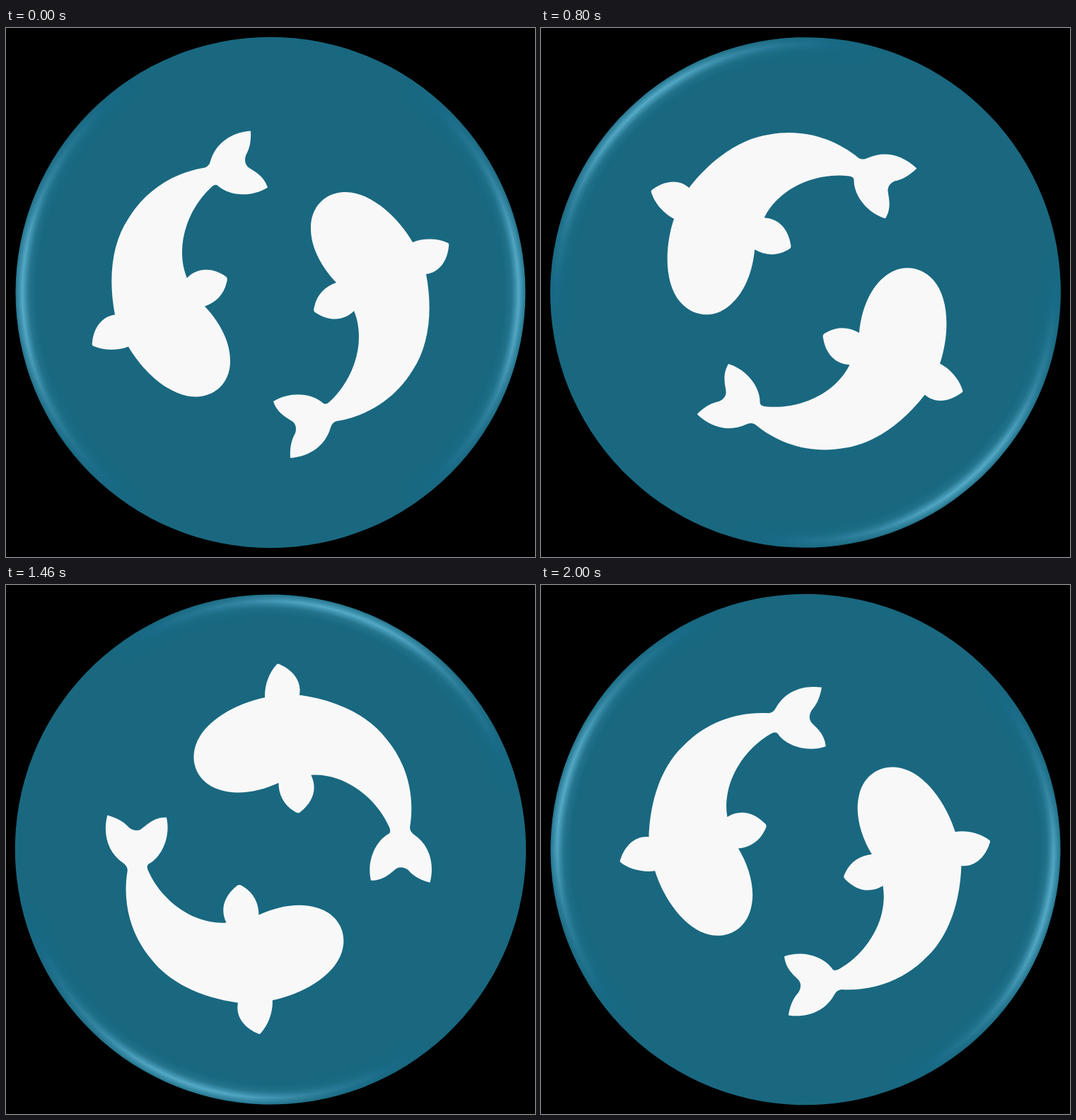
An HTML page for the animation above (2.03 s loop, 748x748 px).

```html
<!DOCTYPE html>
<html lang="en">
<head>
<meta charset="utf-8">
<title>Circling koi</title>
<style>
  html, body { margin: 0; width: 100%; height: 100%; overflow: hidden; background: #000; }
  svg { display: block; width: 100vw; height: 100vh; }
</style>
</head>
<body>
<svg viewBox="0 0 748 748">
  <defs>
    <!-- fades along the rim, away from the left and right ends -->
    <linearGradient id="shine" gradientUnits="userSpaceOnUse" x1="13" y1="0" x2="374" y2="0" spreadMethod="reflect">
      <stop offset="0" stop-color="#5cb2cf"/>
      <stop offset=".05" stop-color="#56abc8" stop-opacity=".9"/>
      <stop offset=".12" stop-color="#4599b8" stop-opacity=".65"/>
      <stop offset=".22" stop-color="#2e83a2" stop-opacity=".55"/>
      <stop offset=".34" stop-color="#1a6c8e" stop-opacity=".6"/>
      <stop offset=".48" stop-color="#196a88" stop-opacity="0"/>
    </linearGradient>
    <!-- profile across the rim -->
    <radialGradient id="profile" gradientUnits="userSpaceOnUse" cx="374" cy="374" r="361">
      <stop offset=".915" stop-color="#fff" stop-opacity="0"/>
      <stop offset=".945" stop-color="#fff" stop-opacity=".22"/>
      <stop offset=".962" stop-color="#fff" stop-opacity=".7"/>
      <stop offset=".972" stop-color="#fff"/>
      <stop offset=".982" stop-color="#fff" stop-opacity=".65"/>
      <stop offset="1" stop-color="#fff" stop-opacity=".15"/>
    </radialGradient>
    <mask id="rim" maskUnits="userSpaceOnUse" x="0" y="0" width="748" height="748">
      <circle cx="374" cy="374" r="361" fill="url(#profile)"/>
    </mask>
    <path id="koi" fill="#f8f8f8" d="M431 284
      C430 255 450 232 480 232 C516 232 554 267 575 303
      C590 297 610 297 625 304 Q627 305 626 309 C624 330 612 346 594 348
      C604 400 598 450 575 484 C550 525 510 549 467 556
      Q461 558 459 565 C452 590 430 606 402 608
      C401 590 405 580 409 573 Q412 563 406 557
      C398 551 384 546 378 528 C400 514 432 515 449 531
      Q453 533 458 528 C483 505 499 470 499 437
      C499 424 497 412 492 400
      C478 414 458 416 437 402 Q434 400 436 394 C440 376 452 365 467 360
      C446 338 431 310 431 284Z"/>
  </defs>
  <g id="badge">
    <ellipse cx="374" cy="374" rx="360.5" ry="361.3" fill="#196880"/>
    <ellipse cx="374" cy="374" rx="360.5" ry="361" fill="url(#shine)" mask="url(#rim)"/>
    <use href="#koi"/>
    <use href="#koi" transform="rotate(180 374 376.7)"/>
  </g>
</svg>
<script>
  const LOOP = 2030, HOLD = 100, STEP = 6, LAG = 0.7;
  const badge = document.getElementById('badge');

  // Three steps per 100 ms, at 0, 30 and 60 ms
  function angleAt(t) {
    if (t < HOLD) return 0;
    const run = t - HOLD;
    const step = 1 + 3 * Math.floor(run / 100) + Math.min(2, Math.floor(run % 100 / 30));
    return step * STEP - LAG;
  }

  function draw() {
    const angle = angleAt(performance.now() % LOOP);
    badge.setAttribute('transform', `rotate(${-angle} 374 374)`);
    requestAnimationFrame(draw);
  }
  draw();
</script>
</body>
</html>
```
